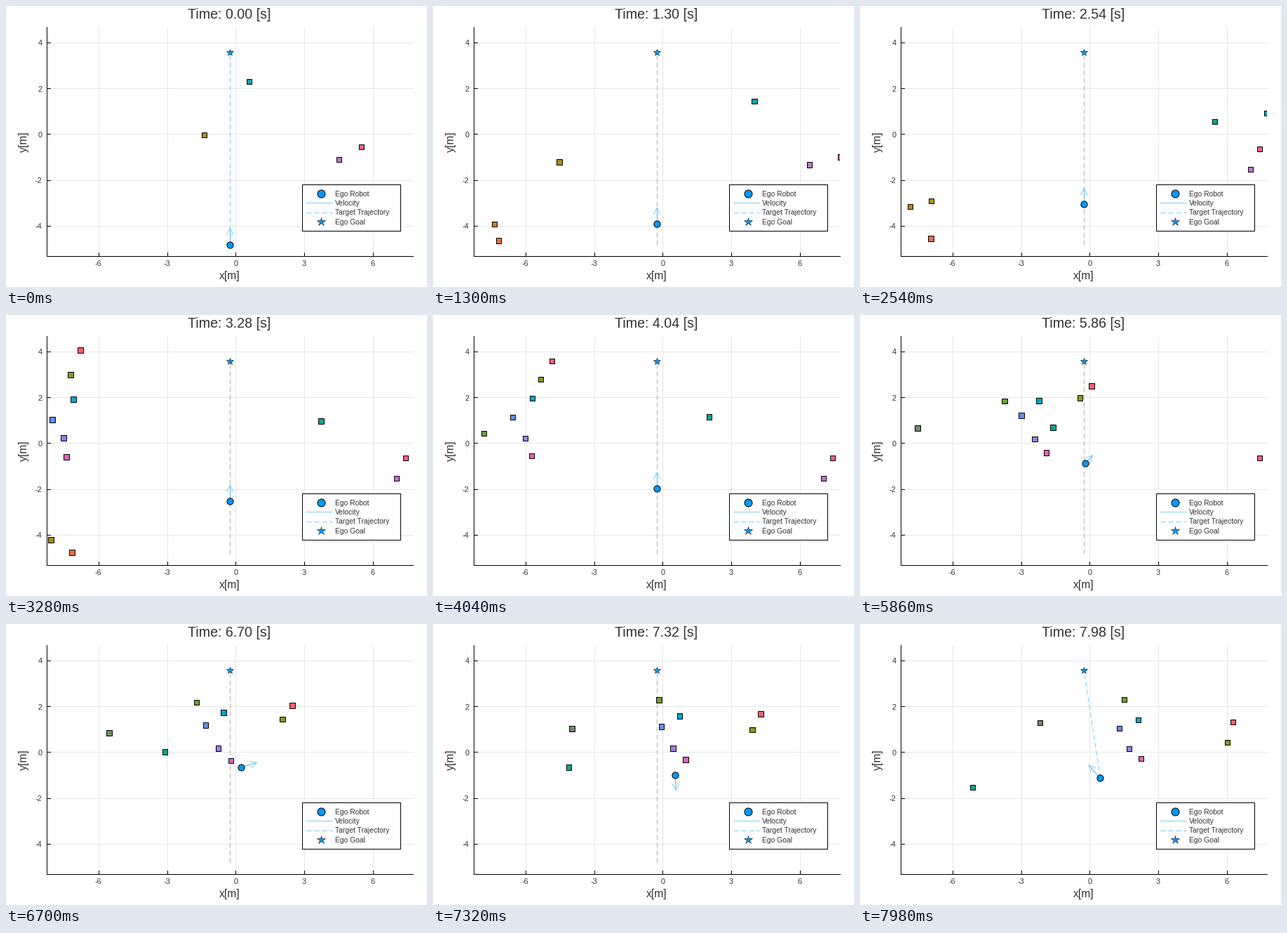
These frames come from a looping animation (600 by 400 pixels, 8 s). A matplotlib script:

```python
import numpy as np
import matplotlib.pyplot as plt
from matplotlib.animation import FuncAnimation
from matplotlib.patches import Rectangle

W, H, DPI = 600, 400, 100
PX = 72 / DPI                     # points per pixel
STEP, FRAMES = 20, 400            # ms per frame, frames per loop
LEFT, RIGHT, TOP, BOTTOM = 58.5, 580.5, 30.5, 356.5
UNIT, X0, Y0 = 32.6, 327.8, 182.9
BLUE, PALE, GREY, INK = "#009AFA", "#7FCCFC", "#B4B4B4", "#333333"
GOAL = (319.7, 66.3)
SPEED = 23.5                      # robot, px per second
REPLAN, FRESH = 7.9, 0.1          # s: second plan, time a plan stays blue
DASH = (0, (7, 4))

plt.rcParams["font.family"] = "Liberation Sans"

# pixel coordinates, half a pixel off so that thin lines snap to whole pixels
fig = plt.figure(figsize=(W / DPI, H / DPI), dpi=DPI, facecolor="white")
ax = fig.add_axes([0, 0, 1, 1])
ax.set_xlim(0.5, W + 0.5)
ax.set_ylim(H + 0.5, 0.5)
ax.axis("off")
frame = Rectangle((LEFT, TOP), RIGHT - LEFT, BOTTOM - TOP,
                  transform=ax.transData)


def line(xs, ys, color="black", z=1, **kw):
    return ax.plot(xs, ys, color=color, lw=PX, zorder=z, **kw)[0]


def marker(x, y, shape, size, z, edge=1.0):
    return ax.plot([x], [y], shape, ms=size * PX, mfc=BLUE, mec="black",
                   mew=edge * PX, zorder=z)[0]


def label(x, y, s, size, ha="center", **kw):
    return ax.text(x, y, s, fontsize=size * PX, color=INK, ha=ha,
                   va="baseline", zorder=12, **kw)


class Walker:
    """Goes from a to b, each (time, x, y), bowed out by bend halfway."""

    def __init__(self, color, a, b, bend=(0, 0), seen=(0, 9), halt=False):
        self.color, self.seen, self.halt = color, seen, halt
        self.t0, self.t1 = a[0], b[0]
        self.a, self.b, self.bend = map(np.array, (a[1:], b[1:], bend))

    def at(self, t):
        if not self.seen[0] <= t <= self.seen[1]:
            return (-50, -50)
        u = (t - self.t0) / (self.t1 - self.t0)
        if self.halt:
            u = min(u, 1)
        return self.a + (self.b - self.a) * u + self.bend * 4 * u * (1 - u)


def crosser(color, x0, y0, x1, y1, bend, since=2.6):
    return Walker(color, (4.04, x0, y0), (7.98, x1, y1), bend, (since, 9))


walkers = [
    Walker("#E36F47", (.4, 72, 349), (3.4, 92, 340), (19, -14), (.4, 3.4)),
    Walker("#AC8E18", (0, 283, 184), (2.54, 102, 278), (-10, -10), (0, 3.4)),
    Walker("#00AAAE", (0, 347, 108), (2.54, 580, 153), (-8, 5), (0, 2.7)),
    Walker("#C371D2", (0, 475, 219), (2.54, 557, 233), (20, 0), (0, 5.4),
           halt=True),
    Walker("#ED5E93", (0, 507, 201), (2.54, 570, 204), (42, 13), (0, 6),
           halt=True),
    Walker("#C68225", (1.3, 88, 311), (2.54, 72, 286), seen=(1, 3.2)),
    Walker("#00A98D", (2.54, 506, 165), (7.98, 161, 233), (-21, -48),
           (1.6, 9)),
    Walker("#718B68", (5.72, 72, 162), (7.98, 257, 141), (-5, 3), (5.72, 9)),
    crosser("#8E971E", 154, 92, 524, 169, (-11, -9)),
    crosser("#00A9CC", 142, 119, 397, 137, (-4, -5)),
    crosser("#9B7FE9", 132, 176, 384, 178, (1, 0)),
    crosser("#618DF6", 114, 146, 370, 149, (-2, -4)),
    crosser("#F06073", 170, 66, 532, 140, (-7, 1)),
    crosser("#DD65B6", 141, 201, 401, 192, (5, 0)),
    crosser("#6C9F33", 73, 169, 377, 108, (-7, -18), 4.02),
]

# robot waypoints: time, x, y, heading in degrees clockwise from up
ROUTE = np.array([
    (0, 319.7, 340, 0),
    (4.1, 319.7, 246.5, 0),
    (4.98, 318, 226.6, -8),
    (6.7, 335.5, 204.6, 73),
    (7.25, 345.5, 214, 176),
    (7.98, 342, 219.2, 319),
])


def ride(t):
    """Robot position and velocity on a smooth path through the waypoints."""
    i = np.clip(np.searchsorted(ROUTE[:, 0], t, "right") - 1,
                0, len(ROUTE) - 2)
    (t0, *p, h0), (t1, *q, h1) = ROUTE[i:i + 2]
    p, q, span = np.array(p), np.array(q), t1 - t0
    a, b = (span * SPEED * np.array([np.sin(h), -np.cos(h)])
            for h in np.radians([h0, h1]))
    u = (t - t0) / span
    c2, c3 = 3 * (q - p) - 2 * a - b, 2 * (p - q) + a + b
    return (p + u * (a + u * (c2 + u * c3)),
            (a + u * (2 * c2 + 3 * u * c3)) / span)


# grid, axes and ticks
for v in (-6, -3, 0, 3, 6):
    x = X0 + UNIT * v
    line([x, x], [TOP, BOTTOM], "#E6E6E6")
    line([x, x], [BOTTOM, BOTTOM - 5], z=3)
    label(x, 370.3, str(v), 11)
for v in (-4, -2, 0, 2, 4):
    y = Y0 - UNIT * v
    line([LEFT, RIGHT], [y, y], "#E6E6E6")
    line([LEFT, LEFT + 5], [y, y], z=3)
    label(52, y + 4.3, str(v), 11, "right")
line([LEFT, LEFT, RIGHT], [TOP, BOTTOM, BOTTOM], z=3)
label(318.8, 390, "x[m]", 15.6)
label(30.3, 193.3, "y[m]", 15.6, rotation=90, rotation_mode="anchor")
title = label(318.5, 19, "", 19.6)

# legend
ax.add_patch(Rectangle((422.5, 254.5), 140, 66, fc="white", ec="black",
                       lw=PX, zorder=10))
ROWS = [267.4 + 13.3 * k for k in range(4)]
for y, s in zip(ROWS, ("Ego Robot", "Velocity", "Target Trajectory",
                       "Ego Goal")):
    label(469.6, y + 3.9, s, 10.4, "left")
marker(449.3, ROWS[0], "o", 11, 11)
line([428, 465], [ROWS[1]] * 2, PALE, 11)
line([428, 465], [ROWS[2]] * 2, PALE, 11, ls=DASH, dash_capstyle="butt")
marker(449.3, ROWS[3], "*", 12.5, 11, 0.5)

# moving parts
path = line([], [], z=4, ls=DASH, dash_capstyle="butt")
shaft = line([], [], "#4DB3EE", 5)
head = line([], [], PALE, 5)
robot = marker(*ROUTE[0, 1:3], "o", 9.2, 6)
marker(*GOAL, "*", 11, 6, 0.5)
squares = ax.scatter([-50] * len(walkers), [-50] * len(walkers), marker="s",
                     s=(7.8 * PX) ** 2, c=[w.color for w in walkers],
                     edgecolors="black", linewidths=PX, zorder=7)
squares.set_clip_path(frame)


def draw(i):
    t = i * STEP / 1000
    title.set_text(f"Time: {t:.2f} [s]")
    squares.set_offsets([w.at(t) for w in walkers])

    pos, vel = ride(t)
    tip = pos + vel
    d = vel / np.hypot(*vel)
    n = np.array([-d[1], d[0]])
    robot.set_data([pos[0]], [pos[1]])
    shaft.set_data(*np.array([pos, tip]).T)
    head.set_data(*np.array([tip - 9.5 * d + 4.7 * n, tip,
                             tip - 9.5 * d - 4.7 * n]).T)

    planned = REPLAN if t >= REPLAN else 0
    path.set_data(*np.array([ride(planned)[0], GOAL]).T)
    path.set_color(PALE if t - planned < FRESH else GREY)
    return title, squares, robot, shaft, head, path


anim = FuncAnimation(fig, draw, frames=FRAMES, interval=STEP, repeat=True,
                     repeat_delay=0)
plt.show()
```
